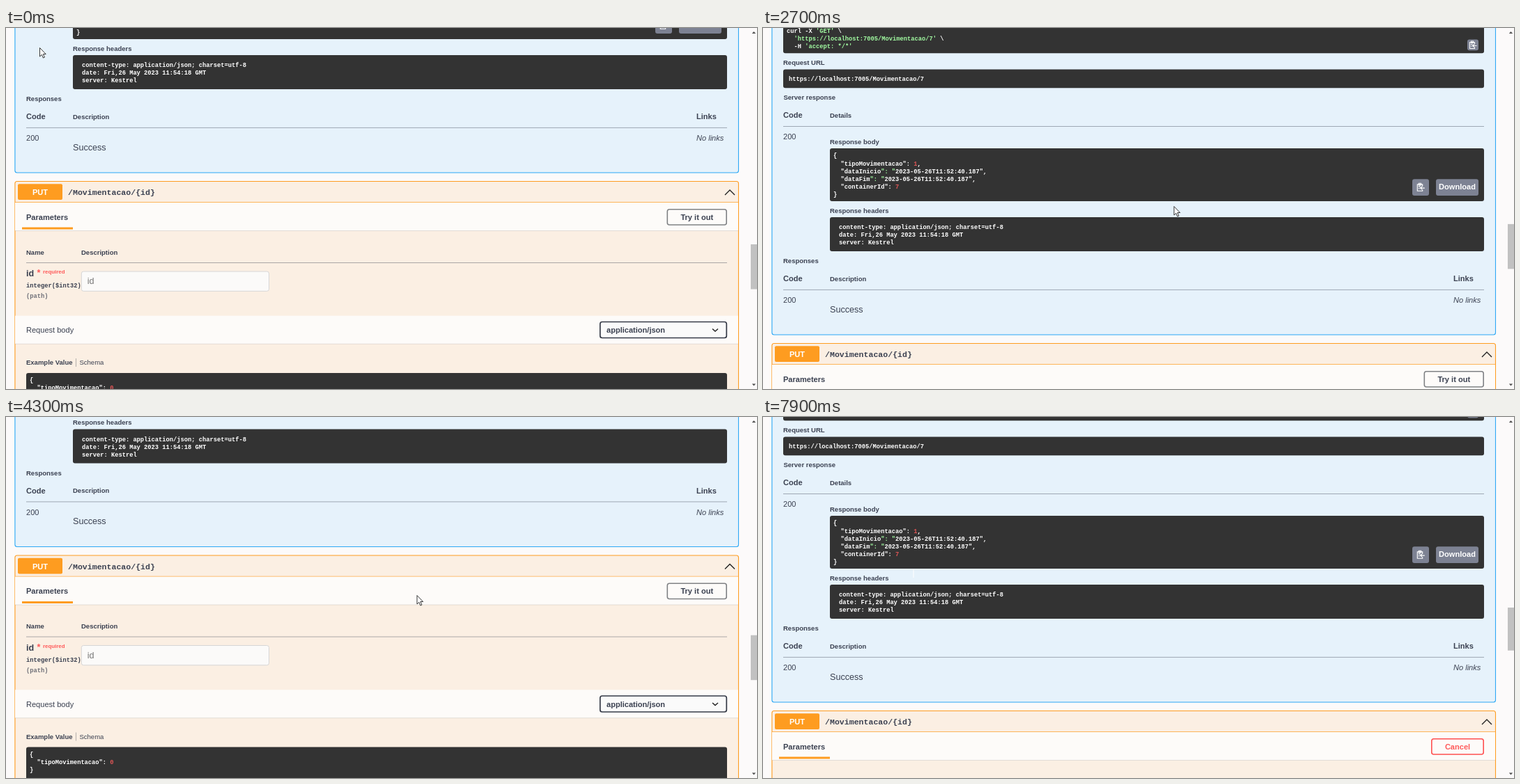
Animation, 1078 px wide and 519 px high, one loop 8 s. Source, as an HTML page:

```html
<!DOCTYPE html>
<html lang="en">
<head>
<meta charset="utf-8">
<title>API documentation</title>
<style>
html, body { margin: 0; height: 100%; overflow: hidden; background: #fcfafa; }
svg { display: block; width: 100vw; height: 100vh; }
text { font-family: "Liberation Sans", Arial, sans-serif; fill: #3b4151; white-space: pre; }
.b { font-weight: 700; }
.i { font-style: italic; }
.m { font: 700 8.74px "Liberation Mono", monospace; }
.c { text-anchor: middle; font-weight: 700; }
.w { fill: #fff; }
.s { fill: #a2fca2; }
.n { fill: #e05656; }
.r { fill: #ff5a5a; }
#glow { fill: none; stroke: #000; stroke-width: 3; filter: blur(1.5px); }
</style>
</head>
<body>
<svg id="stage" viewBox="0 0 1078 519"></svg>
<script>
const BIG = 12.6, MID = 11.05, SMALL = 9.5;
const BLUE = '#2ca8f5', ORANGE = '#fe9c20', DARK = '#333';
const $ = id => document.getElementById(id);

const rect = (x, y, w, h, fill, rest = '') =>
  `<rect x="${x}" y="${y}" width="${w}" height="${h}" fill="${fill}" ${rest}/>`;
const outline = (color, width = 1) => `rx="3" stroke="${color}" stroke-width="${width}"`;
const text = (x, y, str, size = MID, cls = 'b') =>
  `<text x="${x}" y="${y}" font-size="${size}" class="${cls}">${str}</text>`;
const path = (d, color, width = 1.4) =>
  `<path d="${d}" fill="none" stroke="${color}" stroke-width="${width}"/>`;
const rule = y => rect(29, y - .5, 1006, 1, '#3b4151', 'opacity=".42"');
const button = (x, y, w, label, color, cls = 'c') =>
  rect(x + .8, y + .8, w - 1.6, 22.2, 'none', outline(color, 1.6)) +
  text(x + w / 2, y + 15.5, label, MID, cls);

const highlight = line => line.replace(
  /'[^']*'|"[^"]*"(?!:)|(?<=: )\d+(?=,|$)/g,
  s => `<tspan class="${/\d/.test(s[0]) ? 'n' : 's'}">${s}</tspan>`);
const code = (x, y, lines, cls = 'm w') =>
  lines.map((s, i) => text(x, y + i * 11.1, cls === 'm' ? s : highlight(s), 8.74, cls)).join('');
const darkBox = (x, y, h) => rect(x, y, 1035 - x, h, DARK, 'rx="3"');

const strip = (y, fill) => rect(13, y, 1038, 40.5, fill) +
  rect(13, y + 40, 1038, 1, '#000', 'opacity=".1"');

const block = (y, h, color, fill, verb, url) =>
  rect(12.9, y + .5, 1038.6, h, fill, outline(color, 1.1)) +
  rect(13, y + 30.3, 1038, 1, color) +
  rect(17, y + 4.3, 64, 22.7, color, 'rx="2"') +
  text(49, y + 20, verb, MID, 'c w') +
  `<text x="89" y="${y + 20}" class="m" style="font-size:11.57px">${url}</text>` +
  path(`M1032 ${y + 20}l7 -7l7 7`, '#222');

const parameters = (y, color, stripFill, name, col) => {
  const star = 29 + (name === 'id' ? 15.5 : 72.5);
  return strip(y + 31, stripFill) + text(29, y + 55.5, 'Parameters') +
    rect(23, y + 66.5, 73, 3, color) +
    text(29, y + 105.5, 'Name', SMALL) + text(col, y + 105.5, 'Description', SMALL) +
    rule(y + 117.5) +
    text(29, y + 137, name, BIG) + text(star, y + 136, '*', BIG, 'b r') +
    text(star + 8.5, y + 133, 'required', 7.9, 'b r') +
    text(29, y + 153, 'integer($int32)', 8.74, 'm') +
    `<g opacity=".72">${text(29, y + 168, '(path)', 8.74, 'm i')}</g>`;
};

const copyIcon = (x, y, s) => `<g transform="translate(${x} ${y}) scale(${s})">` +
  path('M3 -1V-4H-4V5H3V3M-2 -5.5H1V-3H-2ZM-2.5 -1H0M-2.5 1.5H-1M6 1H0M2.3 -1L0 1L2.3 3', '#fff', 1.1) + '</g>';

const tableHead = (y, second) => text(29, y, 'Code') + text(96, y - .3, second, SMALL) + rule(y + 12.2);

const getBlock =
  block(-803.5, 791, BLUE, '#e6f2fb', 'GET', '/Movimentacao/{containerId}') +
  parameters(-803.5, BLUE, '#f9fcfd', 'containerId', 156) +
  button(959, -764, 76, 'Cancel', '#ff5050', 'c r') +
  rect(155.8, -673.7, 269.4, 28.2, '#fbfbfb', outline('#d9d9d9')) +
  text(164, -655.5, '7', BIG, '') +
  rect(534, -584.5, 492.5, 22, 'none', outline('#808487', 1.6)) +
  rect(37, -585.3, 496.5, 23.5, '#0490e4', 'rx="3"') +
  text(285, -569.5, 'Execute', MID, 'c w') + text(780, -569.5, 'Clear', MID, 'c') +
  strip(-538.5, '#f9fcfd') + text(29, -514.3, 'Responses') +
  text(29, -466, 'Curl', SMALL) + darkBox(29, -459.5, 42.7) +
  code(34, -446.3, ["curl -X 'GET' \\", "  'https://localhost:7005/Movimentacao/7' \\", "  -H 'accept: */*'"]) +
  rect(1011, -436.5, 16, 15.7, '#7d8293', 'rx="3"') + copyIcon(1018.5, -428.5, 1) +
  text(29, -400, 'Request URL', SMALL) + darkBox(29, -393.5, 26.7) +
  code(37, -377, ['https://localhost:7005/Movimentacao/7']) +
  text(29.5, -349.7, 'Server response', SMALL) +
  tableHead(-323.7, 'Details') + text(29, -292.7, '200', MID, '') +
  text(96, -286.5, 'Response body', SMALL) + darkBox(96, -280, 76) +
  code(101, -266.6, ['{', '  "tipoMovimentacao": 1,', '  "dataInicio": "2023-05-26T11:52:40.187",',
    '  "dataFim": "2023-05-26T11:52:40.187",', '  "containerId": 7', '}']) +
  rect(932, -235.8, 24, 23.8, '#7d8293', 'rx="3"') + copyIcon(943.5, -224, 1.05) +
  rect(966, -235.8, 61, 23.8, '#7d8293', 'rx="3"') + text(996.5, -221, 'Download', MID, 'c w') +
  text(96, -187.3, 'Response headers', SMALL) + darkBox(96, -181, 49) +
  code(109, -164, ['content-type: application/json; charset=utf-8',
    'date: Fri,26 May 2023 11:54:18 GMT', 'server: Kestrel']) +
  text(29, -115, 'Responses', SMALL) + tableHead(-88.8, 'Description') + text(991, -88.8, 'Links') +
  text(29, -57.8, '200', MID, '') + text(991, -57.8, 'No links', MID, 'i') +
  text(96, -44.3, 'Success', BIG, '');

const exampleBody = ['{', '  "tipoMovimentacao": 0', '}'];
const putBlock =
  block(0, 800, ORANGE, '#fbefe3', 'PUT', '/Movimentacao/{id}') +
  parameters(0, ORANGE, '#fdfbf9', 'id', 108) +
  rect(108.3, 130, 269.2, 28.3, '#fbfaf9', 'id="field" ' + outline('#d6d6d6')) +
  text(116.8, 148.3, '<tspan id="value"></tspan>', BIG, '') +
  rect(117, 137.5, 1, 13, '#111', 'id="caret"') +
  strip(193.7, '#fdfbf9') + text(29, 218, 'Request body', MID, '') +
  rect(852.8, 202.5, 181.5, 23, '#fafafa', outline('#363b48', 1.7)) +
  text(862, 218, 'application/json') + path('M1014 212.5l4 3.5l4 -3.5', '#222') +
  '<g id="idle">' +
    '<rect id="glow" x="949.5" y="40.5" width="85" height="22.5" rx="3"/>' +
    button(948.5, 40, 86.5, 'Try it out', '#808285') +
    text(29, 264, 'Example Value', SMALL) + rect(100, 255, 1, 12, '#b5b0ac') +
    text(105.5, 264, 'Schema', SMALL, '') +
    darkBox(29, 276, 57) + code(34, 289.3, exampleBody) +
    strip(381, '#fdfbf9') + text(29, 404.5, 'Responses') +
  '</g><g id="editing">' +
    button(959, 40, 76, 'Cancel', '#ff5050', 'c r') +
    text(29, 264, 'Edit Value', SMALL) + rect(80, 255, 1, 12, '#b5b0ac') +
    text(85.5, 264, 'Schema', SMALL, '') +
    rect(29, 276, 1006, 221, '#fefcfa', 'rx="3"') + code(37, 292, exampleBody, 'm') +
  '</g>';

$('stage').innerHTML = `<g id="page">${getBlock}${putBlock}</g>` +
  rect(1069, 0, 9, 64.5, '#c1c1c1', 'id="thumb"') +
  '<path d="M1070.8 8l2.7-3l2.7 3zM1070.8 511.5l2.7 3l2.7-3z" fill="#505050"/>' +
  '<g id="pointer">' +
  '<path id="arrow" d="M.5 .5V13L3.4 10.3L5.4 15L7.4 14.1L5.4 9.5H9.2Z" fill="#fff" stroke="#222" stroke-width=".9"/>' +
  '<path id="hand" d="M-1.4 8V.8Q0 -.8 1.4 .8V5.5L5.5 6.5Q7 7 6.8 9L5.6 13V15.8H-1.6V14L-5.2 9.3Q-5.6 7.5 -3.8 7.7L-1.4 9.6Z" fill="#fff" stroke="#222" stroke-width=".9"/>' +
  '<path id="beam" d="M0 -6V6" stroke="#fff" stroke-width="1"/></g>';

// Keyframes: [time, ...values]
const scrollKeys = [[0, 220], [400, 220], [500, 172], [600, 122], [700, 95], [1000, 95], [1100, 93],
  [2500, 93], [2700, 453], [2800, 560], [3000, 688], [3300, 778.5], [3400, 786], [3700, 786],
  [3800, 700], [3900, 500], [4000, 350], [4100, 260], [4200, 260], [4300, 198.5], [4400, 145],
  [4600, 90], [4700, 83.5], [7600, 83.5], [7700, 240], [7800, 240], [7900, 422]];
const pointerKeys = [[0, 48, 28], [100, 281, 207], [400, 281, 207], [700, 281, 259], [1300, 281, 259],
  [1400, 345, 254], [1600, 900, 165], [1700, 982, 148], [1800, 991.5, 146], [2100, 991.5, 146],
  [2200, 860, 185], [2300, 650, 240], [2400, 589.5, 256], [4500, 589.5, 256], [4600, 640, 240],
  [4900, 930, 150], [5100, 992, 135], [5500, 992, 135], [5600, 927, 135], [5800, 500, 190],
  [6000, 250, 222], [6100, 216, 225]];
const glowKeys = [[0, 0], [1600, 0], [1900, .3], [2100, .3], [2400, 0], [5000, 0], [5300, .3], [5600, .3]];

function at(keys, t) {
  const k = keys.findIndex(key => key[0] > t);
  if (k < 0) return keys.at(-1).slice(1);
  const a = keys[k - 1], b = keys[k], u = (t - a[0]) / (b[0] - a[0]);
  return a.slice(1).map((v, i) => v + (b[i + 1] - v) * u);
}
const show = (id, on) => $(id).setAttribute('visibility', on ? 'visible' : 'hidden');

function draw(now) {
  const t = Math.floor(now % 8000 / 100) * 100;
  const [top] = at(scrollKeys, t), [x, y] = at(pointerKeys, t);
  const editing = t >= 5700, typed = t >= 7000;
  const inside = (x0, x1, y0, y1) => x >= x0 && x <= x1 && y >= top + y0 && y <= top + y1;

  $('page').setAttribute('transform', `translate(0 ${top})`);
  show('idle', !editing);
  show('editing', editing);
  $('glow').style.opacity = at(glowKeys, t)[0];
  $('field').setAttribute('fill', editing ? '#fff' : '#fbfaf9');
  $('value').textContent = typed ? '7' : 'id';
  $('value').style.fill = typed ? '#3b4151' : '#777';
  show('caret', (t >= 6200 && t < 6700) || (typed && t < 7500));
  $('caret').setAttribute('x', typed ? 123 : 117);

  // The page grows while editing, so the thumb shrinks
  const shrink = editing ? .957 : 1;
  $('thumb').setAttribute('y', 12 + (299 + (220 - top) * .125) * shrink);
  $('thumb').setAttribute('height', 64.5 * shrink);

  const hand = !editing && inside(949, 1035, 40, 63);
  const beam = t >= 6100 || inside(108, 378, 130, 158);
  $('pointer').setAttribute('transform', `translate(${x} ${y})`);
  show('hand', hand);
  show('beam', beam);
  show('arrow', !hand && !beam);
  $('beam').setAttribute('stroke', t >= 7700 ? '#fff' : '#333');
  requestAnimationFrame(draw);
}
requestAnimationFrame(draw);
</script>
</body>
</html>
```
